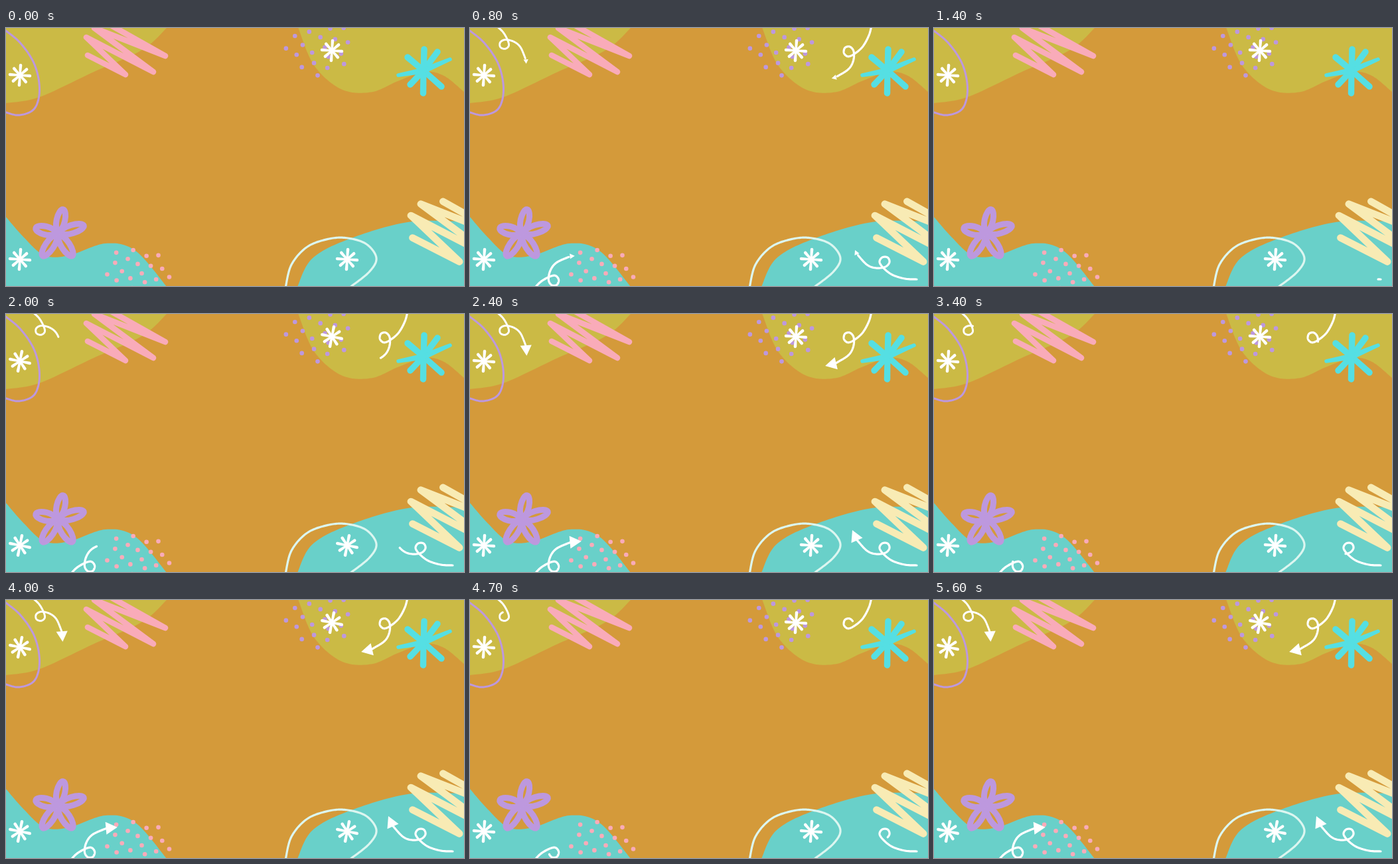
An HTML page with a canvas that plays this animation: 690x388 px, repeating every 5.7 s.

```html
<!DOCTYPE html>
<html lang="en">
<head>
<meta charset="utf-8">
<title>Doodle frame</title>
<style>
html, body { margin: 0; width: 100%; height: 100%; overflow: hidden; background: #d49a3a; }
canvas { display: block; }
</style>
</head>
<body>
<canvas id="stage" width="690" height="388"></canvas>
<script>
const ctx = document.getElementById('stage').getContext('2d');
const LOOP = 5700;
const STARTS = [0, 1310, 2850, 4190];
const DRAW = 870;
const C = {
  ground: '#d49a3a', olive: '#cbba45', teal: '#69d0c9', pink: '#f9abb9',
  purple: '#bd98de', cyan: '#55dfe3', cream: '#f8ebb4', pale: '#dcf6f0', white: '#fff'
};

// Catmull-Rom curve through a few points, sampled densely
function curve(...p) {
  const out = [];
  const at = i => p[Math.max(0, Math.min(p.length - 1, i))];
  for (let i = 0; i < p.length - 1; i++)
    for (let t = 0; t < 1; t += 1 / 16)
      out.push([0, 1].map(k => {
        const [a, b, c, d] = [-1, 0, 1, 2].map(j => at(i + j)[k]);
        return b + t / 2 * (c - a + t * (2 * a - 5 * b + 4 * c - d + t * (3 * (b - c) + d - a)));
      }));
  out.push(at(p.length));
  return out;
}

function trace(pts) {
  ctx.beginPath();
  pts.forEach(([x, y]) => ctx.lineTo(x, y));
}

function line(pts, color, width) {
  trace(pts);
  ctx.strokeStyle = color;
  ctx.lineWidth = width;
  ctx.stroke();
}

function fill(pts, color) {
  trace(pts);
  ctx.fillStyle = color;
  ctx.fill();
}

const BLOBS = [
  [C.olive, [...curve([0, 113], [50, 104], [130, 67], [205, 33], [243, -1]), [0, -1]]],
  [C.olive, [...curve([440, -1], [464, 56], [505, 92], [550, 96.5], [590, 80], [630, 66],
    [660, 72], [691, 97]), [691, -1]]],
  [C.teal, [...curve([-1, 283], [27, 315], [58, 342], [95, 342], [150, 324], [195, 335],
    [242, 389]), [-1, 389]]],
  [C.teal, [...curve([439, 389], [461, 347], [515, 318], [605, 292], [691, 291]), [691, 389]]]
];
const LOOP_TL = curve([-3, 2], [22, 23], [43, 55], [50.5, 92], [43, 121], [20, 131], [-3, 126]);
const LOOP_BR = curve([421, 391], [430, 356], [454, 329], [487, 317], [515, 316], [543, 325],
  [558, 346], [547, 367], [518, 390]);
const SCRIBBLE = [[39, -17], [119, 28], [12, -14], [101, 52], [0, 0], [59, 56], [2, 27]];
const SPLASH = [[630, 32], [650, 36], [669, 47], [656, 88], [628.5, 98], [609, 85], [591, 71], [605, 44]];
const PETALS = [[87, 269], [121, 296], [102, 346], [53, 346], [41, 300]];
const STARS = [[21, 71], [491, 34], [21, 348], [514, 348]];

// One looping arrow around its own ring, placed at x, y with turn and scale
const SWIRL = curve([48, 26], [30, 25], [11, 19], [-2, 9], [-8, 0], [-4, -7], [4, -7], [7, 0],
  [1, 7], [-13, 9], [-27, 4], [-42, -12]);
const BASE = [-42, -11.5], TIP = [-49, -27];
const ARROWS = [[51.5, 24, -160, 0.92], [571, 35, -79, 1], [125.5, 380, 109, 1.02], [625, 352, 0, 1]];

function scribble(x, y, scale, color) {
  line(SCRIBBLE.map(([a, b]) => [x + a * scale, y + b * scale]), color, 8.6 * scale);
}

// Evenly scattered dots on a sunflower spiral
function dots(x, y, rx, ry, count, color) {
  ctx.fillStyle = color;
  for (let i = 0; i < count; i++) {
    const r = Math.sqrt((i + 0.5) / count), a = i * 2.4;
    ctx.beginPath();
    ctx.arc(x + rx * r * Math.cos(a), y + ry * r * Math.sin(a), 3.3, 0, 7);
    ctx.fill();
  }
}

// Brush arm with a width at the centre and one at the tip
function arm(x0, y0, x1, y1, w0, w1, color) {
  const a = Math.atan2(y1 - y0, x1 - x0), h = Math.PI / 2;
  ctx.fillStyle = color;
  ctx.beginPath();
  ctx.arc(x1, y1, w1 / 2, a - h, a + h);
  ctx.arc(x0, y0, w0 / 2, a + h, a + 3 * h);
  ctx.fill();
}

function partOf(pts, part) {
  const step = i => Math.hypot(pts[i][0] - pts[i - 1][0], pts[i][1] - pts[i - 1][1]);
  let left = 0;
  for (let i = 1; i < pts.length; i++) left += step(i) * part;
  const out = [pts[0]];
  for (let i = 1; i < pts.length && left > 0; i++) {
    const d = step(i), k = Math.min(1, left / d);
    const [x, y] = pts[i - 1];
    out.push([x + (pts[i][0] - x) * k, y + (pts[i][1] - y) * k]);
    left -= d;
  }
  return out;
}

function arrow(x, y, turn, scale, u) {
  const part = (1 - Math.cos(Math.PI * Math.min(1, u / DRAW))) / 2;
  if (part < 0.01) return;
  ctx.save();
  ctx.translate(x, y);
  ctx.rotate(turn * Math.PI / 180);
  ctx.scale(scale, scale);
  line(partOf(SWIRL, part), C.white, 3.2);
  const p = Math.max(0, Math.min(1, (u - 740) / 360));
  const s = 1 - (1 - p) ** 3, w = 0.55;
  const [bx, by] = BASE, dx = (TIP[0] - bx) * s, dy = (TIP[1] - by) * s;
  if (s) fill([[bx + dx, by + dy], [bx - dy * w, by + dx * w], [bx + dy * w, by - dx * w]], C.white);
  ctx.restore();
}

function star(x, y, pose) {
  for (let i = 0; i < 8; i++) {
    const a = i * Math.PI / 4 + (pose ? 0.2 : 0.07), r = i % 2 ? 13.4 : 15;
    arm(x, y, x + r * Math.cos(a), y + r * Math.sin(a), 3.2, 4.6, C.white);
  }
}

function flower(x, y) {
  ctx.strokeStyle = C.purple;
  ctx.lineWidth = 9;
  PETALS.forEach(([px, py]) => {
    const len = Math.hypot(px - x, py - y);
    ctx.beginPath();
    ctx.ellipse((x + px) / 2, (y + py) / 2, len / 2 - 4, 6.3, Math.atan2(py - y, px - x), 0, 2 * Math.PI);
    ctx.stroke();
  });
}

function draw(t) {
  const u = t - STARTS.filter(s => s <= t).pop();
  const pose = Math.floor(u / 126) % 2;
  ctx.lineCap = ctx.lineJoin = 'round';
  ctx.fillStyle = C.ground;
  ctx.fillRect(0, 0, 690, 388);
  BLOBS.forEach(([color, pts]) => fill(pts, color));
  line(LOOP_TL, C.purple, 3);
  line(LOOP_BR, C.pale, 3.2);
  scribble(121, 14, 1, C.pink);
  scribble(610, 282, 1.24, C.cream);
  dots(472, 29, 55, 44, 21, C.purple);
  dots(197, 369, 50, 42, 22, C.pink);
  SPLASH.forEach(([x, y], i) => arm(629, 64, x, y, 9, i % 4 === 2 ? 5.5 : 9.5, C.cyan));
  flower(78, 309);
  ARROWS.forEach(a => arrow(...a, u));
  STARS.forEach(([x, y]) => star(x, y, pose));
}

const begin = performance.now();
function tick() {
  // the picture advances in tenths of a second
  const t = (performance.now() - begin) % LOOP;
  draw(Math.floor(t / 100) * 100);
  requestAnimationFrame(tick);
}
tick();
</script>
</body>
</html>
```
